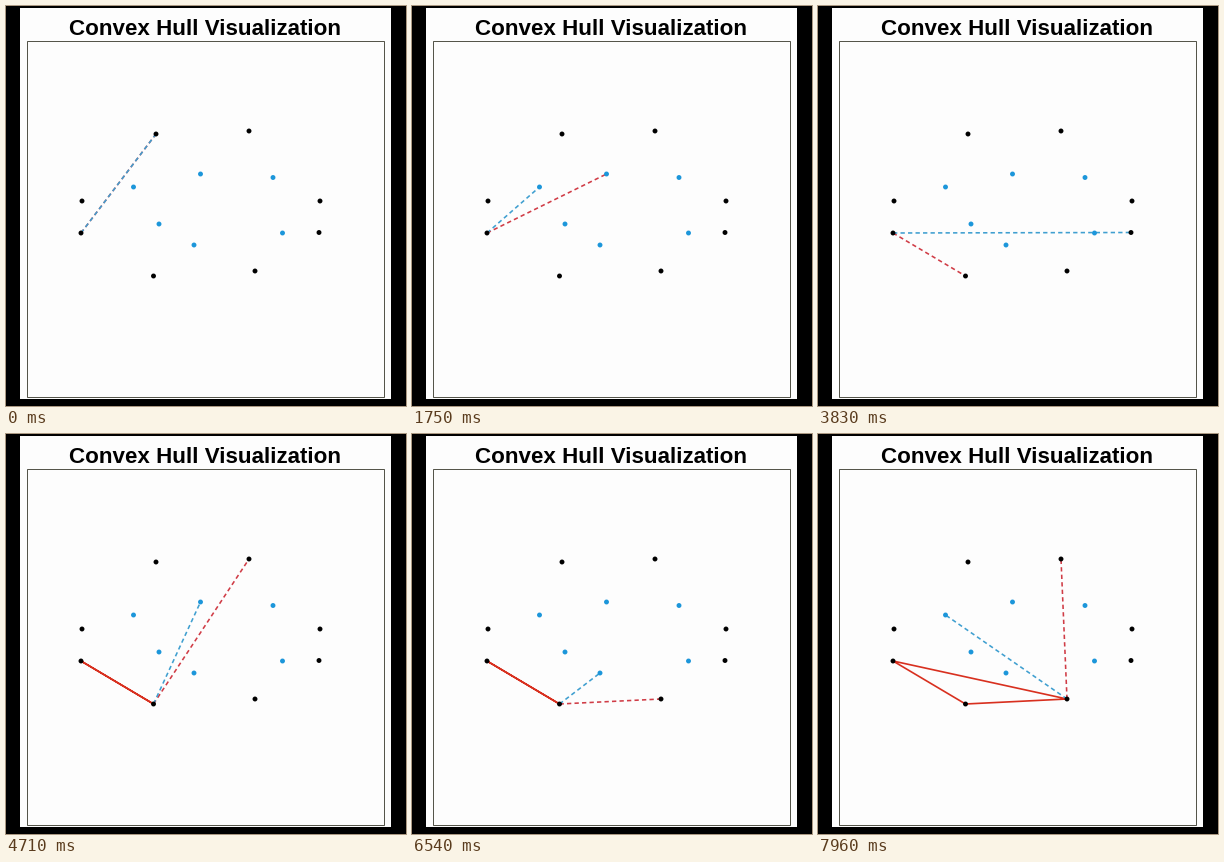
Write a matplotlib script that moves like this. It is 400 by 400 pixels and loops after 8 s.

```python
import matplotlib.pyplot as plt
from matplotlib.animation import FuncAnimation
from matplotlib.patches import Rectangle

SIZE, DPI = 400, 100
FRAMES, INTERVAL = 200, 40
START, STEP = 1030, 8000 / 38.4      # ms before the scan, ms per comparison

PAPER, FRAME = "#fdfdfd", "#55554a"
RED, DASH_RED = "#d8301f", "#d03c46"
BLUE, DASH_BLUE = "#1c96da", "#3f9fd0"

# The sites, in the order in which the scan visits them
POINTS = [(150, 128), (243, 125), (194.5, 168), (127.5, 181), (267, 171.5),
          (76, 195), (75, 227), (276.5, 227), (249, 265), (147.5, 270),
          (153, 218), (188, 239), (314, 195), (313, 226.5)]
LEFTMOST = min(range(len(POINTS)), key=lambda i: POINTS[i][0])


def turn(a, b, c):
    (ax, ay), (bx, by), (cx, cy) = POINTS[a], POINTS[b], POINTS[c]
    return (bx - ax) * (cy - ay) - (by - ay) * (cx - ax)


def gift_wrap():
    """Return the full hull and (hull so far, best, candidate) per comparison."""
    states, hull = [], [LEFTMOST]
    while True:
        best = 0
        for cand in range(len(POINTS)):
            states.append((tuple(hull), best, cand))
            if best == hull[-1] or turn(hull[-1], best, cand) > 0:
                best = cand
        states.append((tuple(hull), best, None))
        if best == LEFTMOST:
            return hull, states
        hull.append(best)


HULL, STATES = gift_wrap()

fig = plt.figure(figsize=(SIZE / DPI, SIZE / DPI), dpi=DPI, facecolor="black")
ax = fig.add_axes([0, 0, 1, 1])
ax.set_xlim(0, SIZE)
ax.set_ylim(SIZE, 0)
ax.axis("off")

ax.add_patch(Rectangle((13.5, 1.5), 371.5, 391.5, fc=PAPER, ec="none"))
ax.add_patch(Rectangle((20.9, 34.9), 357, 356, fill=False, ec=FRAME, lw=0.72))
ax.text(199, 28.8, "Convex Hull Visualization", family="Liberation Sans",
        weight="bold", size=16.1, ha="center", va="baseline", color="black")

colors = ["black" if i in HULL else BLUE for i in range(len(POINTS))]
ax.scatter(*zip(*POINTS), s=12.5, c=colors, linewidths=0, zorder=5)

DASH = (0, (2.7, 2.0))
edges, = ax.plot([], [], color=RED, lw=1.2, zorder=2)
best_line, = ax.plot([], [], color=DASH_RED, lw=1.15, ls=DASH, zorder=3)
cand_line, = ax.plot([], [], color=DASH_BLUE, lw=1.15, ls=DASH, zorder=4)


def join(line, ids):
    line.set_data([POINTS[i][0] for i in ids], [POINTS[i][1] for i in ids])


def draw(frame):
    k = max(0, int((frame * INTERVAL - START) // STEP))
    hull, best, cand = STATES[min(k, len(STATES) - 1)]
    join(edges, hull + hull[:1] if len(hull) > 1 else ())
    join(best_line, (hull[-1], best))
    join(cand_line, () if cand is None else (hull[-1], cand))
    return edges, best_line, cand_line


anim = FuncAnimation(fig, draw, frames=FRAMES, interval=INTERVAL,
                     init_func=lambda: draw(0), repeat=True, repeat_delay=0)
plt.show()
```
